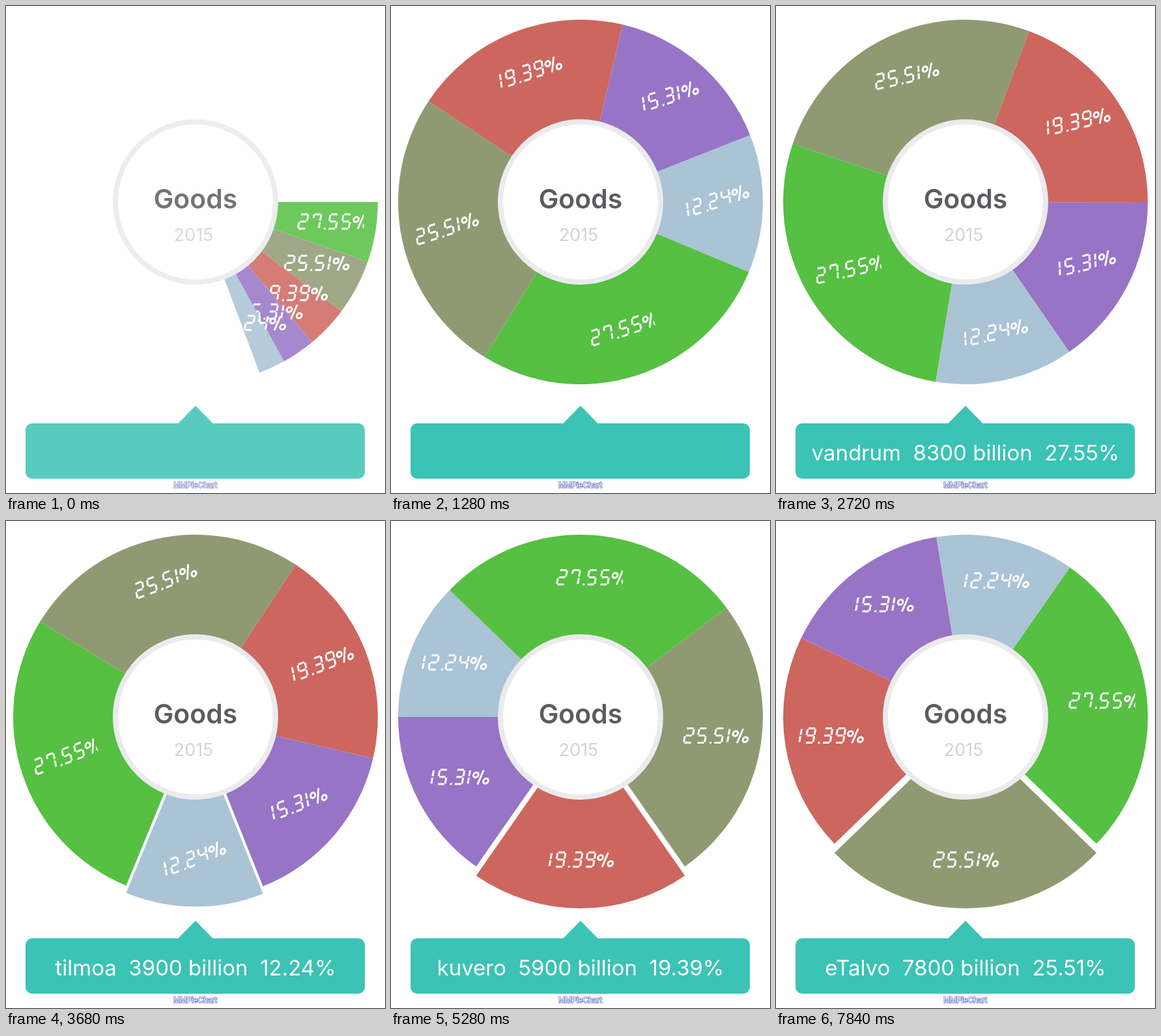
An HTML page that plays this animation: 582 by 748 pixels, repeating every 8 s.

```html
<!DOCTYPE html>
<html lang="en">
<head>
<meta charset="utf-8">
<title>Pie chart</title>
<style>
  html, body { margin: 0; width: 100%; height: 100%; overflow: hidden; background: #fff; }
  svg { display: block; width: 100%; height: 100%; }
  text { text-anchor: middle; white-space: pre; font-family: Inter, Roboto, sans-serif; }
  .title { font-size: 41px; font-weight: 600; fill: #5d5b5f; }
  .year { font-size: 27px; font-weight: 400; fill: #d6d2d4; }
  .caption { font-size: 33px; font-weight: 400; fill: #fff; }
  .credit {
    font: 12px "Liberation Sans", Arial, sans-serif;
    fill: #fff; stroke: #6b74c4; stroke-width: 1.6px; paint-order: stroke;
  }
  .glyphs { fill: none; stroke: #fff; stroke-width: 3px; }
</style>
</head>
<body>
<svg viewBox="0 0 582 748">
  <defs><clipPath id="frame"><rect x="-51.5" y="-32" width="103" height="52"/></clipPath></defs>
  <g id="stage">
    <g id="pie"></g>
    <circle cx="291" cy="301" r="123" fill="#fff" stroke="#ebebed" stroke-width="8"/>
    <text class="title" x="291" y="311">Goods</text>
    <text class="year" x="288" y="361">2015</text>
    <path d="M264 641.5L291 614L318 641.5Z" fill="#3bc3b5"/>
    <rect x="30" y="641" width="521" height="85" rx="10" fill="#3bc3b5"/>
    <text class="caption" id="caption" x="291" y="698"></text>
    <text class="credit" x="290.5" y="740">MMPieChart</text>
  </g>
</svg>
<script>
const LOOP = 8000, STEP = 160;
const CX = 291, CY = 301, RADIUS = 280, LABEL_R = 210, PULL = 14;
const TURN_TIME = 1058, SHIFT_TIME = 212, GROW_START = -322;

const slices = [
  { pct: 27.55, color: '#55c041', caption: 'vandrum  8300 billion  27.55%' },
  { pct: 25.51, color: '#8f9a73', caption: 'eTalvo  7800 billion  25.51%' },
  { pct: 19.39, color: '#cd665e', caption: 'kuvero  5900 billion  19.39%' },
  { pct: 15.31, color: '#9774c6', caption: '' },
  { pct: 12.24, color: '#aac3d5', caption: 'tilmoa  3900 billion  12.24%' }
];
const picks = [
  { at: 715, index: 0 },
  { at: 1970, index: 4 },
  { at: 3640, index: 2 },
  { at: 5340, index: 1 }
];

// Slanted seven-segment lettering
const segments = {
  A: 'M2.5 1.5H12.5', B: 'M13.5 2.4V11.4', C: 'M13.5 13.6V22.6', D: 'M2.5 23.5H12.5',
  E: 'M1.5 13.6V22.6', F: 'M1.5 2.4V11.4', G: 'M2.8 12.5H12.2',
  H: 'M2.5 1.5V7', I: 'M2.3 2.4V11.4', J: 'M2.3 13.6V22.6'
};
const digits = { 1: 'IJ', 2: 'ABGED', 3: 'ABGCD', 4: 'FGBC', 5: 'AFGCD', 7: 'HABC', 9: 'ABCDFG' };
const percent = 'M6.2 9.5a3.8 3.8 0 1 0-7.6 0a3.8 3.8 0 1 0 7.6 0' +
  'M23 18.8a3.8 3.8 0 1 0-7.6 0a3.8 3.8 0 1 0 7.6 0M13 2L7.3 24';
const dot = 'M1 23.5H4';

const advance = c => c === '.' ? 6 : c === '1' ? 10 : c === '%' ? 25 : 20;
const outline = c => c === '.' ? dot : c === '%' ? percent : [...digits[c]].map(s => segments[s]).join('');

const pie = document.getElementById('pie');
const stage = document.getElementById('stage');
const caption = document.getElementById('caption');

function add(parent, tag, attrs) {
  const el = document.createElementNS('http://www.w3.org/2000/svg', tag);
  for (const k in attrs) el.setAttribute(k, attrs[k]);
  return parent.appendChild(el);
}

function addLabel(parent, text) {
  const label = add(parent, 'g', { 'clip-path': 'url(#frame)', 'aria-label': text });
  const width = [...text].reduce((sum, c) => sum + advance(c), 0);
  let x = -Math.min(width, 103) / 2;
  for (const c of text) {
    add(label, 'path', {
      class: 'glyphs', d: outline(c),
      transform: `translate(${x + 4.4} -17.5) skewX(-10)`
    });
    x += advance(c);
  }
  return label;
}

let total = 0;
for (const s of slices) {
  s.start = total;
  s.sweep = s.pct * 3.6;
  s.mid = s.start + s.sweep / 2;
  total += s.sweep;
  s.group = add(pie, 'g', {});
  s.wedge = add(s.group, 'path', { fill: s.color });
  s.label = addLabel(s.group, s.pct.toFixed(2) + '%');
}

const clamp = x => Math.max(0, Math.min(1, x));

// Ease-in-out: cubic-bezier(.42, 0, .58, 1)
function ease(x) {
  if (x <= 0) return 0;
  if (x >= 1) return 1;
  let lo = 0, hi = 1;
  for (let i = 0; i < 24; i++) {
    const s = (lo + hi) / 2;
    if (1.26 * s - 0.78 * s * s + 0.52 * s * s * s < x) lo = s; else hi = s;
  }
  return lo * lo * (3 - 2 * lo);
}

function polar(r, deg) {
  const a = deg * Math.PI / 180;
  return [CX + r * Math.cos(a), CY + r * Math.sin(a)];
}

// Each pick quickly levels the labels for the new angle and pushes the old slice in
// while the pie starts to turn; the new slice comes out when the turn is over.
function stateAt(t) {
  const state = { turn: 0, level: 0, pulls: slices.map(() => 0), shown: -1 };
  let from = 0, last = -1;
  for (const { at, index } of picks) {
    if (t < at) break;
    const to = (450 - slices[index].mid) % 360;
    const shift = clamp((t - at) / SHIFT_TIME);
    const turn = ease((t - at) / TURN_TIME);
    state.turn = from + (to - from) * turn;
    state.level = from + (to - from) * shift;
    state.pulls.fill(0);
    if (last >= 0) state.pulls[last] = PULL * (1 - shift);
    state.pulls[index] = PULL * clamp((t - at - TURN_TIME) / SHIFT_TIME);
    state.shown = turn === 1 ? index : last;
    from = to;
    last = index;
  }
  return state;
}

function draw(t) {
  const { turn, level, pulls, shown } = stateAt(t);
  const grow = ease((t - GROW_START) / TURN_TIME);
  slices.forEach((s, i) => {
    const start = turn + s.start * grow;
    const sweep = s.sweep * grow;
    const mid = start + sweep / 2;
    const [lx, ly] = polar(LABEL_R, mid);
    const [px, py] = polar(pulls[i], mid);
    s.wedge.setAttribute('d',
      `M${CX} ${CY}L${polar(RADIUS, start)}A${RADIUS} ${RADIUS} 0 0 1 ${polar(RADIUS, start + sweep)}Z`);
    s.label.setAttribute('transform', `translate(${lx} ${ly}) rotate(${turn - level})`);
    s.group.setAttribute('transform', `translate(${px - CX} ${py - CY})`);
  });
  const text = shown < 0 ? '' : slices[shown].caption;
  if (caption.textContent !== text) caption.textContent = text;
  stage.setAttribute('opacity', Math.min(1, 0.85 + 0.15 * t / STEP));
}

const begin = performance.now();
function tick() {
  const t = (performance.now() - begin) % LOOP;
  draw(Math.floor(t / STEP) * STEP);
  requestAnimationFrame(tick);
}
tick();
</script>
</body>
</html>
```
